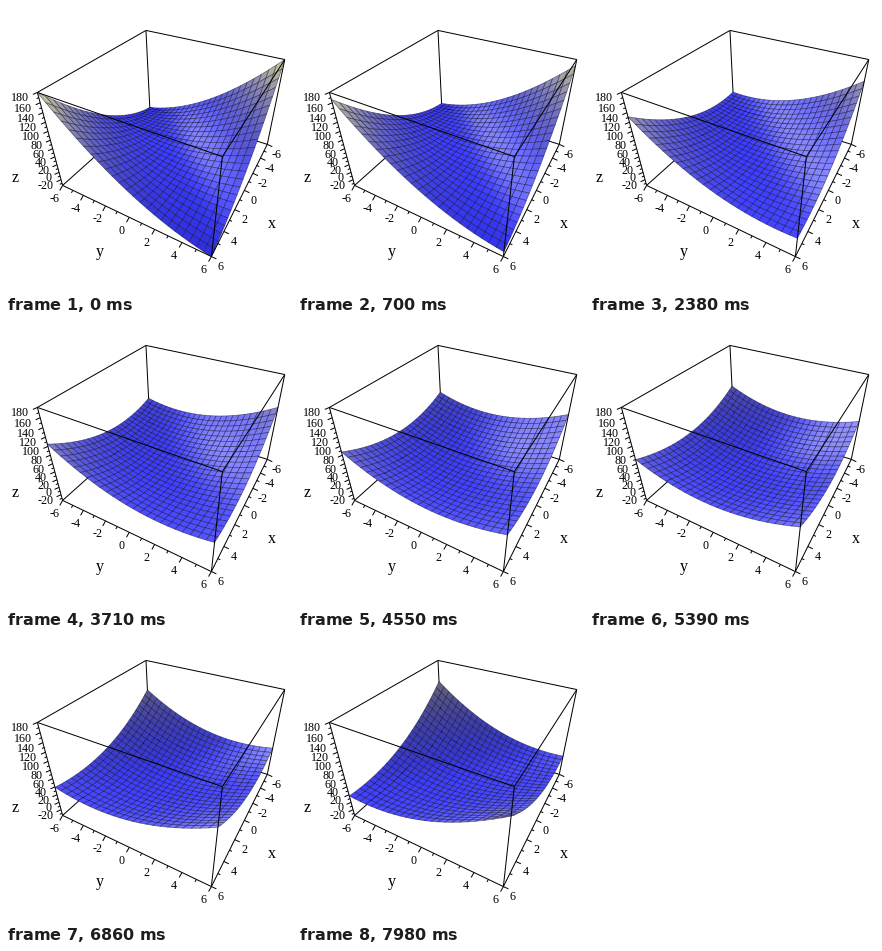
Animation, 286 px wide and 287 px high, one loop 8 s. Source, as a matplotlib script:

```python
import numpy as np
import matplotlib.pyplot as plt
from matplotlib.animation import FuncAnimation
from matplotlib.collections import LineCollection, PolyCollection

W, H, DPI = 286, 287, 64
PX = 72 / DPI                      # one pixel in points
LOOP, INTERVAL = 8000, 20
Z_MIN, Z_MAX = -36, 180

# Box corners and where they appear on the stage
CORNERS = {
    (-6, -6, Z_MAX): (139, 24), (-6, 6, Z_MAX): (278, 53),
    (6, 6, Z_MAX): (217, 150), (6, -6, Z_MAX): (31, 86),
    (-6, -6, Z_MIN): (143.7, 100.8), (-6, 6, Z_MIN): (261, 138),
    (6, 6, Z_MIN): (204, 250), (6, -6, Z_MIN): (56, 179),
}


def fit_camera():
    rows, values = [], []
    for (x, y, z), (u, v) in CORNERS.items():
        p = [x / 6, y / 6, z / 100]
        rows.append(p + [1, 0, 0, 0, 0] + [-u * c for c in p])
        rows.append([0, 0, 0, 0] + p + [1] + [-v * c for c in p])
        values += [u, v]
    solution = np.linalg.lstsq(np.array(rows), np.array(values), rcond=None)[0]
    return np.append(solution, 1).reshape(3, 4)


CAMERA = fit_camera()


def project(x, y, z):
    """Stage position and depth of points in plot coordinates."""
    x, y, z = np.broadcast_arrays(x, y, z)
    p = np.stack([x / 6, y / 6, z / 100, np.ones(x.shape)], axis=-1) @ CAMERA.T
    return p[..., :2] / p[..., 2:], p[..., 2]


def point(x, y, z):
    return project(x, y, z)[0]


fig = plt.figure(figsize=(W / DPI, H / DPI), dpi=DPI, facecolor="white")
ax = fig.add_axes([0, 0, 1, 1])
ax.set_xlim(-0.5, W - 0.5)
ax.set_ylim(H - 0.5, -0.5)
ax.axis("off")


def add_lines(segments, zorder):
    ax.add_collection(LineCollection(segments, colors="black",
                                     linewidths=PX, zorder=zorder))


def add_text(x, y, text, size=12, ha="center"):
    ax.text(x, y, text, fontsize=size * PX, family="Liberation Serif",
            ha=ha, va="center_baseline")


# Box
back, right, front, left = (-6, -6), (-6, 6), (6, 6), (6, -6)


def edge(a, b, za, zb):
    return [point(*a, za), point(*b, zb)]


add_lines([edge(left, back, Z_MAX, Z_MAX), edge(back, right, Z_MAX, Z_MAX),
           edge(left, back, Z_MIN, Z_MIN), edge(back, right, Z_MIN, Z_MIN),
           edge(back, back, Z_MIN, Z_MAX)], 1)
add_lines([edge(left, front, Z_MAX, Z_MAX), edge(front, right, Z_MAX, Z_MAX),
           edge(left, front, Z_MIN, Z_MIN), edge(front, right, Z_MIN, Z_MIN)]
          + [edge(c, c, Z_MIN, Z_MAX) for c in (left, front, right)], 3)

# Ticks and labels
ticks = []


def add_tick(place, direction, major):
    ticks.append([place, place + np.array(direction) * (1 if major else 0.5)])


for value in range(-6, 7):
    major = value % 2 == 0
    on_x, on_y = point(value, 6, Z_MIN), point(6, value, Z_MIN)
    add_tick(on_x, (5, 2.3), major)
    add_tick(on_y, (-2.8, 5), major)
    if major:
        add_text(on_x[0] + 9.5, on_x[1] + 9, str(value))
        add_text(on_y[0] - 8, on_y[1] + 12, str(value))
for value in range(-30, 181, 10):
    on_z = point(6, -6, value)
    major = value % 20 == 0
    add_tick(on_z, (-4.5, 2), major)
    if major:
        add_text(on_z[0] - 8, on_z[1] + 4.5, str(value), ha="right")
add_lines(ticks, 3)

for name, x, y in (("x", 265, 216), ("y", 93, 243), ("z", 9, 169)):
    add_text(x, y, name, 16)

# Surface
grid = np.linspace(-6, 6, 25)
X, Y = np.meshgrid(grid, grid, indexing="ij")
mid = (grid[:-1] + grid[1:]) / 2
XM, YM = (m.ravel() for m in np.meshgrid(mid, mid, indexing="ij"))
Z_SCALE = 0.042                    # height to width ratio of the box units
LIGHT = np.array([-0.4, -0.4, 0.82])
GLOSS = np.array([0.3, -0.3, 0.9])
GLOSS /= np.linalg.norm(GLOSS)
LOW, HIGH = np.array([0.22, 0.22, 1.04]), np.array([1.15, 1.13, 0.75])

surface = PolyCollection([], edgecolors=(0, 0, 0.12, 0.5),
                         linewidths=0.7 * PX, zorder=2)
ax.add_collection(surface)


def height(x, y, k):
    return x**2 + y**2 + k * x * y


def shade(k):
    normal = np.stack([-(2 * XM + k * YM) * Z_SCALE,
                       -(2 * YM + k * XM) * Z_SCALE,
                       np.ones(XM.size)], axis=1)
    normal /= np.linalg.norm(normal, axis=1, keepdims=True)
    level = (height(XM, YM, k) - Z_MIN) / (Z_MAX - Z_MIN)
    base = LOW + (HIGH - LOW) * level[:, None]**2
    diffuse = 0.5 + 0.58 * np.clip(normal @ LIGHT, 0, 1)
    gloss = 0.27 * np.clip(normal @ GLOSS, 0, 1)**30
    return np.clip(base * diffuse[:, None] + gloss[:, None], 0, 1)


def step_at(ms):
    """Steps last 210 ms; every sixteenth one lasts 280 ms."""
    cycle, tick = divmod(int(ms // 70), 49)
    return 16 * cycle + (0 if tick < 4 else 1 + (tick - 4) // 3)


def update(frame):
    k = -3 + 6 * step_at(frame * INTERVAL + INTERVAL / 2) / 49
    spots, depth = project(X, Y, height(X, Y, k))
    quads = np.stack([spots[:-1, :-1], spots[1:, :-1],
                      spots[1:, 1:], spots[:-1, 1:]], axis=2).reshape(-1, 4, 2)
    far = (depth[:-1, :-1] + depth[1:, :-1]
           + depth[1:, 1:] + depth[:-1, 1:]).ravel()
    order = np.argsort(-far)
    surface.set_verts(quads[order])
    surface.set_facecolor(shade(k)[order])
    return [surface]


anim = FuncAnimation(fig, update, frames=LOOP // INTERVAL, interval=INTERVAL,
                     repeat=True, repeat_delay=0, blit=False)
plt.show()
```
